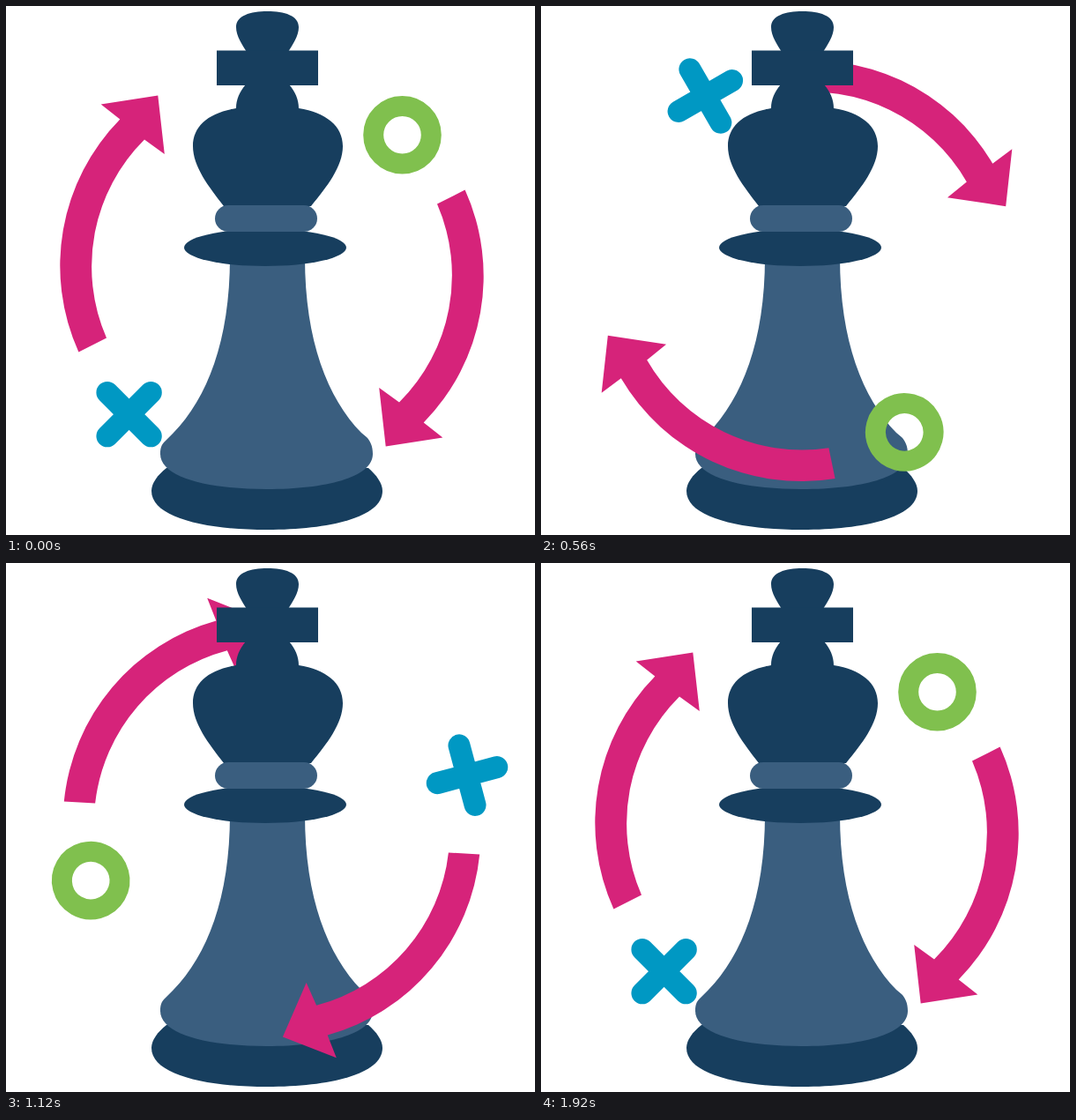
Write an HTML page that moves like this. It is 600 by 600 pixels and loops after 1960 ms.

```html
<!DOCTYPE html>
<html lang="en">
<head>
<meta charset="utf-8">
<title>Chess king with orbiting moves</title>
<style>
  html, body { margin: 0; width: 100%; height: 100%; overflow: hidden; background: #fff; }
  svg { display: block; width: 100vw; height: 100vh; }
  .dark { fill: #173e5e; }
  .light { fill: #3a5e7f; }
  .arrow { fill: #d6237a; }
  .cross { fill: none; stroke: #0098c3; stroke-width: 25; stroke-linecap: round; }
  .ring { fill: none; stroke: #80c04e; stroke-width: 23; }
</style>
</head>
<body>
<svg viewBox="0 0 600 600">
  <defs>
    <path id="arrow" class="arrow" d="M82.4 392.4 A237 237 0 0 1 129.3 128.5 L107.7 111.4 L172.3 101.5 L179.8 168 L157 151.5 A203 203 0 0 0 114 376.5 Z"/>
  </defs>

  <!-- foot and body, behind the orbit -->
  <path class="dark" d="M182 524 C172 532 165 541 165 550 C165 580 225 594 296 594 C367 594 427 580 427 550 C427 541 420 532 411 524 Z"/>
  <path class="light" d="M254 285 C254 380 228 445 190 484 L180 494 C176 498 175 502 175 508 C175 535 230 548 296 548 C362 548 416 535 416 508 C416 499 413 493 409 489 L403 484 C365 445 339 380 339 285 Z"/>

  <g id="orbit">
    <use href="#arrow"/>
    <use href="#arrow" transform="rotate(180 301.5 300.5)"/>
    <path class="cross" d="M114.9 438.4 L164.3 487.8 M164.3 438.4 L114.9 487.8"/>
    <circle class="ring" cx="449.5" cy="146.2" r="32.8"/>
  </g>

  <!-- head and collar, in front of the orbit -->
  <ellipse class="dark" cx="294" cy="274" rx="92" ry="21"/>
  <path class="dark" d="M273 52 C268 44 261 34 261 24 C261 11 277 6 296.5 6 C316 6 332 11 332 24 C332 34 325 44 320 52 Z"/>
  <rect class="dark" x="239" y="50.5" width="115" height="39.5"/>
  <path class="dark" d="M272 89 C265 97 261 106 261 116 C230 121 212 136 212 159 C212 182 230 205 247 227 H346 C364 205 382 182 382 159 C382 136 363 121 332 116 C332 106 328 97 321 89 Z"/>
  <rect class="light" x="237" y="226" width="116" height="30" rx="15"/>
</svg>
<script>
  const LOOP = 1960, STEP = 40, DEGREES_PER_STEP = 7.5;
  const orbit = document.getElementById('orbit');
  const start = performance.now();

  function draw(time) {
    const step = Math.floor((time % LOOP) / STEP);
    orbit.setAttribute('transform', `rotate(${step * DEGREES_PER_STEP} 301.5 300.5)`);
  }

  function tick() {
    draw(performance.now() - start + 0.5);
    requestAnimationFrame(tick);
  }
  tick();
</script>
</body>
</html>
```
